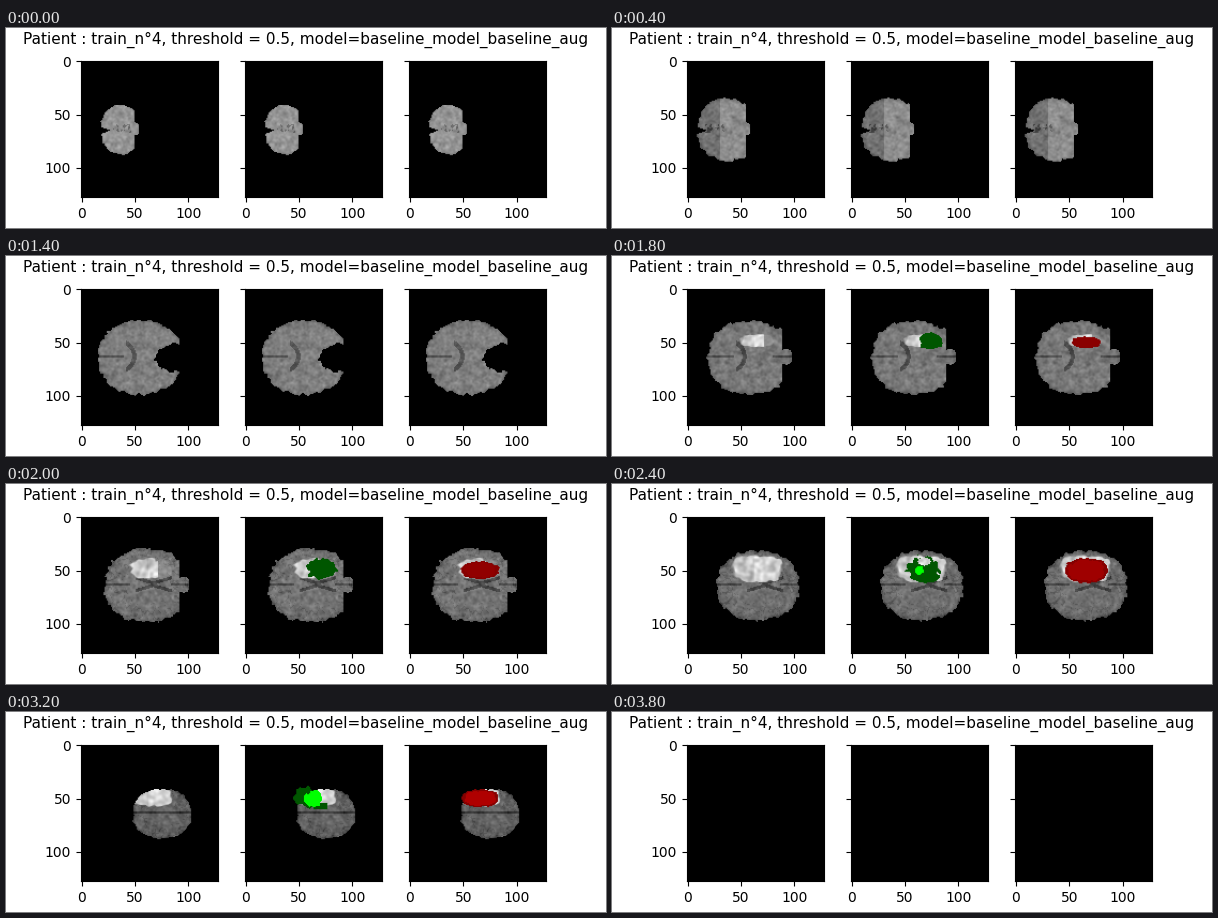
Write a matplotlib script that moves like this. It is 600x200 px and loops after 4 s.

```python
import numpy as np
import matplotlib.pyplot as plt
from matplotlib.animation import FuncAnimation

N, FRAMES, STEP_MS = 128, 20, 200
CY, MID = 64.5, 63.3
Y, X = np.mgrid[:N, :N].astype(float)


def blob(cx, cy, rx, ry, p=2.0):
    """Superellipse distance: below 1 inside."""
    return (np.abs(X - cx) / rx) ** p + (np.abs(Y - cy) / ry) ** p


def noise(seed, blur):
    field = np.random.default_rng(seed).normal(size=(N, N))
    for _ in range(blur):
        for axis in (0, 1):
            field = (np.roll(field, 1, axis) + 2 * field + np.roll(field, -1, axis)) / 4
    return field / field.std()


def extent(k):
    """Left end, right end and half height of the slice."""
    left = np.interp(k, [0, 2, 4, 11, 14, 18], [18, 9.5, 9.5, 23, 34, 61])
    right = np.interp(k, [0, 2, 5, 10, 14, 18], [54, 59, 85, 101, 107.5, 98])
    return left, right, 34.5 * np.sqrt(1 - abs((k - 8) / 10.4) ** 2.3)


def growth(k):
    """Size of the lesion, zero outside the slices that cut it."""
    return np.sin(np.pi * np.clip((k - 8) / 10, 0, 1)) ** 0.35 if 8 < k < 18 else 0


def outline(k):
    left, right, half = extent(k)
    rx = (right - left) / 2 + 4 * np.sin(np.pi * min(k, 8) / 8)
    rim = blob(left + rx, CY, rx, half, 2.15) + 0.045 * noise(k, 3)
    stem_len = 4.5 if k < 4 else 9 if 9 <= k < 12 else 0
    mask = (rim < 1) & (X < right - stem_len)
    if k < 4:
        mask &= np.abs(Y - MID - 2) > 0.35 * (left + 9 - X)
    elif k < 10:
        tip = 61 + 2 * (k - 5) ** 2
        shape = 6 if k < 6 else 2
        mask &= blob(tip + 20, MID + 2, 20, 13, shape) + 0.1 * noise(k + 5, 3) > 1
    if stem_len:
        mask |= blob(right - 5.5, MID + 0.5, 5.5, 5 + stem_len / 4, 2.5) < 1
    return mask, rim


def ventricles(k):
    x, y = X - extent(k)[0], np.abs(Y - MID)
    if k < 4:
        return (np.abs(x - 20 + 2 * k) < 9) & (y < 4) & (noise(k + 80, 1) > 0.5)
    if k < 7:
        fork = (np.abs(y - 0.42 * (x - 27)) < 1.6) & (x > 27) & (x < 47)
        return fork | (np.abs(np.hypot(x - 33, y) - 4) < 1)
    if k < 10:
        return (np.abs(np.hypot(x - 20, y) - 14) < 2) & (x > 26)
    if k < 13:
        return (np.abs(y - 0.3 * np.abs(x - 46) - 1) < 1.6) & (np.abs(x - 46) < 17)
    return np.zeros((N, N), bool)


def tissue(k, rim):
    left, right, _ = extent(k)
    slab = min(8 + 11 * k, 71)
    back = 150 - 3.2 * k
    gray = np.where(X > slab, back, min(back, 108 + 3 * k))
    gray = gray + 6 * noise(k + 40, 1) + 6 * noise(k + 60, 4)
    gray -= 120 * np.clip(rim - 0.82, 0, 0.25)
    gray -= 45 * ventricles(k)
    if k > 4:
        ends = (X < left + 24) | (X > right - 18) | (k > 12)
        gray -= 45 * ends * (np.abs(Y - MID) < 0.9)
    if k > 9:
        gray -= 16 * (np.abs(noise(k + 90, 5)) < 0.2) * (rim > 0.25)

    size = growth(k)
    if size:
        d = blob(65, 48.5, 23 * size, 13 * size ** 2, 3) + 0.16 * noise(k + 11, 5)
        weight = np.clip((1.15 - d) / 0.35, 0, 1) * (Y < MID - 1.5)
        if k < 12:
            weight *= np.where(X > slab, 0.25, 1)
        gray += weight * (198 + 15 * noise(k + 12, 4) + 15 * (X > 62) - gray)
    return np.clip(gray, 20, 250)


def paint_truth(k, rgb):
    size = growth(k)
    if not size:
        return
    rough = 0.2 * noise(k + 30, 3)
    dark = blob(71.5 - 2.4 * (k - 10), 49, 16 * size, 12 * size, 1.9) + rough < 1
    if k > 11:
        dark |= blob(70, 57.5, 8 * size, 4 * size, 8) < 1
        dark &= blob(68, 42, 6, 4) > 1
    rgb[dark] = 0, 86, 0
    core = 8.5 * np.clip((k - 10) / 4, 0.01, 1)
    rgb[blob(63.5, 50.5, core, 0.9 * core) + rough < 1] = 0, 255, 0


def paint_prediction(k, rgb):
    size = growth(k)
    if not size:
        return
    d = blob(66, 50.3, 20.5 * size, 11.8 * size ** 2, 2.3) + 0.08 * noise(k + 33, 3)
    rgb[d < 1] = 134, 0, 0
    rgb[d < 0.7] = min(145 + 7 * (k - 10), 175), 0, 0


def panels(k):
    gray = np.zeros((N, N))
    if k < FRAMES - 1:
        mask, rim = outline(k)
        gray = np.where(mask, tissue(k, rim), 0)
    scans = [np.repeat(gray[..., None], 3, 2).astype(np.uint8) for _ in range(3)]
    paint_truth(k, scans[1])
    paint_prediction(k, scans[2])
    return scans


fig, axes = plt.subplots(1, 3, sharey=True, figsize=(6, 2), dpi=100)
fig.suptitle("Patient : train_n°4, threshold = 0.5, model=baseline_model_baseline_aug", fontsize=11)
images = [ax.imshow(scan) for ax, scan in zip(axes, panels(0))]


def update(k):
    for image, scan in zip(images, panels(k)):
        image.set_data(scan)
    return images


anim = FuncAnimation(fig, update, frames=FRAMES, interval=STEP_MS, repeat=True, repeat_delay=0)
plt.show()
```
